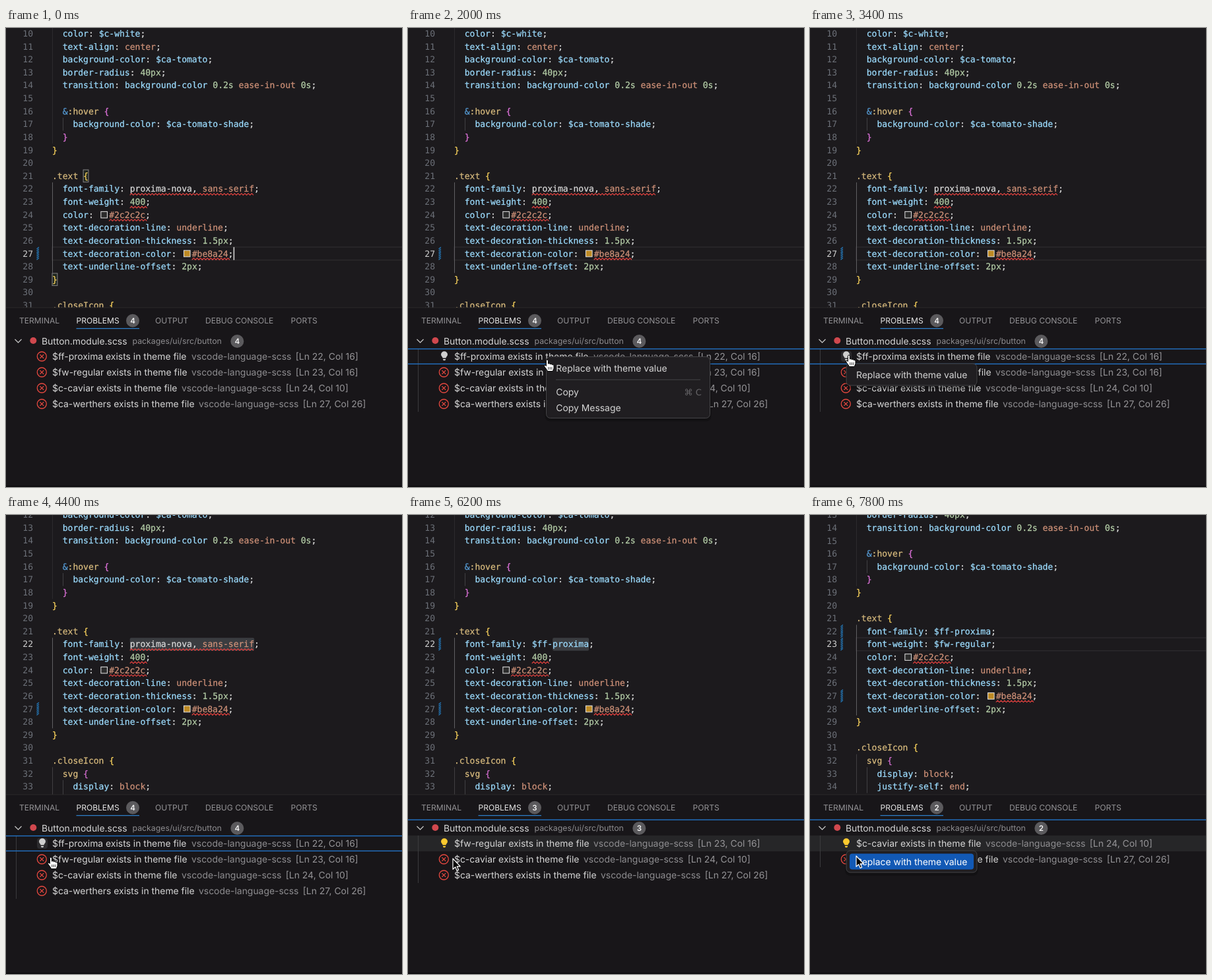
An HTML page for the animation above (8 s loop, 600 by 696 pixels).

```html
<!DOCTYPE html>
<html lang="en">
<head>
<meta charset="utf-8">
<title>Problems panel quick fix</title>
<style>
html, body { margin: 0; width: 100%; height: 100%; overflow: hidden; background: #1c1a1d; }
svg { display: block; width: 600px; height: 696px; font: 13.92px Inter, sans-serif; text-rendering: geometricPrecision; }
text { white-space: pre; }
.code { font: 13.04px "DejaVu Sans Mono", monospace; stroke-width: .25px; }
.tab { font-size: 12.05px; }
.path { font-size: 12.3px; }
.badge { font-size: 11.5px; font-weight: 600; text-anchor: middle; }
.keys { font: 13px "DejaVu Sans", sans-serif; }
</style>
</head>
<body>
<svg id="stage" viewBox="0 0 600 696"></svg>
<script>
const LOOP = 8000, STEP = 200;
const CHAR = 7.85, LINE = 19.62, LEFT = 70, SWATCH = 15.5, ROW = 24, LIST = 486;
const FIRST = 10;
const source = `  color: $c-white;
  text-align: center;
  background-color: $ca-tomato;
  border-radius: 40px;
  transition: background-color 0.2s ease-in-out 0s;

  &:hover {
    background-color: $ca-tomato-shade;
  }
}

.text {
  font-family: proxima-nova, sans-serif;
  font-weight: 400;
  color: #2c2c2c;
  text-decoration-line: underline;
  text-decoration-thickness: 1.5px;
  text-decoration-color: #be8a24;
  text-underline-offset: 2px;
}

.closeIcon {
  svg {
    display: block;
    justify-self: end;`.split('\n');

// message, location, x of the grey part
const problems = [
  ['$ff-proxima', '[Ln 22, Col 16]', 281],
  ['$fw-regular', '[Ln 23, Col 16]', 281],
  ['$c-caviar', '[Ln 24, Col 10]', 266],
  ['$ca-werthers', '[Ln 27, Col 26]', 292]
];

// pointer tip: time, x, y
const pointer = [
  [200, 430, 560], [600, 240, 530], [1000, 206, 514], [1400, 211, 503], [2600, 211, 503],
  [3000, 59, 496], [3400, 59, 496], [3600, 68, 519], [4600, 68, 519], [4800, 60, 503],
  [5000, 58, 497], [5400, 58, 497], [5800, 68, 521], [6800, 68, 521], [7200, 58, 497],
  [7600, 58, 497], [7800, 70, 517]
];

const rect = (x, y, w, h, fill, extra = '') =>
  `<rect x="${x}" y="${y}" width="${w}" height="${h}" fill="${fill}" ${extra}/>`;
const path = (d, stroke, width = 1, fill = 'none') =>
  `<path d="${d}" fill="${fill}" stroke="${stroke}" stroke-width="${width}" stroke-linejoin="round"/>`;
const text = (x, y, str, fill, cls = '') =>
  `<text x="${x}" y="${y}" fill="${fill}" class="${cls}">${str}</text>`;
const circle = (x, y, r, fill, extra = '') =>
  `<circle cx="${x}" cy="${y}" r="${r}" fill="${fill}" ${extra}/>`;
const badge = (x, y, n) => circle(x, y, 10, '#5b5a5d') + text(x, y + 4.2, n, '#f4f4f4', 'badge');
const colX = col => LEFT + col * CHAR;

function tokenColor(token, nested) {
  if (/^[{}]$/.test(token)) return nested ? '#da70d6' : '#ffd75e';
  if (token === '&') return '#569cd6';
  if (/^(:hover|\.|svg)/.test(token)) return '#d7ba7d';
  if (/^([:;,]|proxima)/.test(token)) return '#d8d8d8';
  if (/^\d/.test(token)) return '#b5cea8';
  if (/^(\$|color|text-|background|border|transition|font|display|justify)/.test(token)) return '#9cdcfe';
  return '#ce9178';
}

function codeLine(line, y) {
  const nested = line.startsWith('  ');
  const tokens = line.match(/\s+|&|:hover|[:;,{}]|[^\s:;,{}&]+/g) || [];
  const spans = tokens.map(tok => {
    const gap = tok[0] === '#' ? ` dx="${SWATCH}"` : '';
    const color = tokenColor(tok, nested);
    return `<tspan fill="${color}" stroke="${color}"${gap}>${tok.replace('&', '&amp;')}</tspan>`;
  });
  return text(LEFT, y, spans.join(''), '#d8d8d8', 'code');
}

function squiggle(x, y, width) {
  return path(`M${x} ${y}` + 'l2.6-2.6 2.6 2.6'.repeat(Math.round(width / 5.2)), '#e5423f', 1.2);
}

function hatch(y) {
  let d = '';
  for (let i = 0; i < 7; i++) d += `M46.5 ${y + 3 + i * 2.7}l3.4-3`;
  return path(d, '#2478b8', 1.3);
}

function editor(t) {
  const scroll = t < 4000 ? 0 : t < 6400 ? 48 : 67.6;
  const active = t < 4000 ? 27 : t < 6400 ? 22 : 23;
  const fixed = { 22: t >= 4600, 23: t >= 6800 };
  const base = n => 13 + (n - FIRST) * LINE - scroll;
  const top = n => base(n) - 14.3;
  const guide = (x, from, to, color) => path(`M${x} ${top(from)}V${top(to + 1)}`, color);
  let out = '';

  const select = (col, len) => rect(colX(col), top(active), len * CHAR, LINE, '#3a3c40', 'rx="2"');
  if (active === 22) out += t < 4600 ? select(15, 24) : select(19, 7);
  else if (active === 23 && t < 7000) out += select(15, t < 6800 ? 3 : 11);
  else out += rect(LEFT, top(active), 540, LINE, 'none', 'stroke="#2b292c" stroke-width="1.5"');

  out += guide(70.5, 10, 18, '#2c2b2e') + guide(86.5, 17, 17, '#403f42') +
    guide(70.5, 22, 28, '#605f62') + guide(70.5, 32, 34, '#403f42') + guide(86.5, 33, 34, '#403f42');

  if (t < 1600) {
    for (const [col, n] of [[6, 21], [0, 29]])
      out += rect(colX(col), top(n) + .5, CHAR, LINE - 1, '#20261f', 'stroke="#858487"');
  }

  source.forEach((line, i) => {
    const n = FIRST + i, y = base(n);
    if (fixed[n]) line = line.replace(/: .*;/, () => `: ${problems[n - 22][0]};`);
    out += text(25.3, y, n, n === active ? '#d0d0d0' : '#6c7078', 'code') + codeLine(line, y);
    if (n === 27 || fixed[n]) out += hatch(top(n));

    const hex = line.indexOf('#');
    if (hex > 0) {
      out += rect(colX(hex) + 3.2, y - 9.3, 9.6, 9.6, line.slice(hex, hex + 7), 'stroke="#e6e6e6"') +
        squiggle(colX(hex) + SWATCH, y + 5, 7 * CHAR);
    }
    if ((n === 22 || n === 23) && !fixed[n])
      out += squiggle(colX(15), y + 5, (n === 22 ? 24 : 3) * CHAR);
  });

  if (t < 1600 && t % 1000 < 500) out += rect(344.5, top(27), 1.7, LINE, '#c8c8c8');
  return out;
}

function bulb(y, color) {
  return path(`M52.6 ${y + 2.5}C52.4 ${y + .6} 50 ${y - .3} 50 ${y - 2.7}a5 5 0 0 1 10 0C60 ${y - .3} 57.6 ${y + .6} 57.4 ${y + 2.5}Z` +
    `M53 ${y + 4}h4v1.2q-2 2-4 0Z`, 'none', 0, color);
}

function errorIcon(y) {
  return circle(54.3, y, 7, 'none', 'stroke="#e5483f" stroke-width="1.3"') +
    path(`M51.4 ${y - 2.9}l5.8 5.8m0-5.8l-5.8 5.8`, '#e5483f', 1.3);
}

function panel(t, at) {
  const count = t < 4800 ? 4 : t < 7000 ? 3 : 2;
  const ring = t >= 1600 && t < 4800;
  let hover = -1;
  if (t >= 4800) hover = 0;
  else if (t >= 200 && t < 1600) hover = Math.floor((at[1] - LIST) / ROW);

  let out = rect(0, 424, 600, 272, '#181619') + rect(0, 423.5, 600, 1, '#2a282b') + rect(0, 694, 600, 2, '#0e0d0f');
  [['TERMINAL', 20], ['PROBLEMS', 106.5], ['OUTPUT', 226], ['DEBUG CONSOLE', 302], ['PORTS', 431.5]]
    .forEach(([name, x], i) => out += text(x, 448.2, name, i === 1 ? '#e7e7e7' : '#959497', 'tab'));
  out += rect(106.5, 455, 95.5, 1.3, '#2d7cc4') + badge(192, 443.7, count);

  if (t >= 4800) out += rect(0, 461.5, 600, 1.4, '#2272c3');
  out += path('M13.5 472l5 5 5-5', '#c5c5c5', 1.2) + circle(41.3, 474, 5, '#d0484e') +
    text(54, 479.6, 'Button.module.scss', '#d6d6d6') +
    text(191.5, 479.3, 'packages/ui/src/button', '#8d8c8f', 'path') + badge(350.3, 475, count);

  if (hover >= 0) out += rect(0, LIST + hover * ROW, 600, ROW, '#262628');
  if (t >= 200) out += rect(15, LIST, 1, count * ROW, '#3b3a3d');
  // the focus outline runs off both sides
  if (ring) out += rect(-2, LIST + .6, 604, ROW - 1.2, 'none', 'stroke="#2272c3" stroke-width="1.4"');
  if (ring && t >= 3000) out += rect(47, 490, 16, 16, '#2c2b2e', 'rx="4"');

  problems.slice(4 - count).forEach(([name, place, x], i) => {
    const y = LIST + 12 + i * ROW;
    if (i === hover) out += bulb(y, '#fbc92e');
    else if (ring && i === 0) out += bulb(y, '#cfcfcf');
    else out += errorIcon(y);
    out += text(70, y + 5, name + ' exists in theme file', '#d6d6d6') +
      text(x, y + 5, 'vscode-language-scss', '#8e8d90') + text(x + 157.8, y + 5, place, '#959497');
  });
  return out;
}

function popup(x, y, w, h) {
  return rect(x - 2, y + 1, w + 4, h + 4, '#000', 'rx="8" opacity=".25"') +
    rect(x, y, w, h, '#201e21', 'rx="6" stroke="#454447"');
}

function contextMenu() {
  return popup(209.5, 498.5, 248, 93) + rect(224, 532.8, 219, 1, '#434245') +
    text(224.3, 521, 'Replace with theme value', '#d6d6d6') + text(224.3, 557, 'Copy', '#d6d6d6') +
    text(418.5, 556.5, '⌘ C', '#656467', 'keys') + text(224.3, 581, 'Copy Message', '#d6d6d6');
}

function fixMenu(picked) {
  return popup(55, 509, 198, 33) + (picked ? rect(60, 513.5, 188, 24, '#1259b5', 'rx="4"') : '') +
    text(70, 530.5, 'Replace with theme value', picked ? '#fff' : '#d6d6d6');
}

function cursor([x, y], arrow) {
  const shape = arrow
    ? path('M0 0V16.2L3.7 12.8 6.2 18.4 8.6 17.3 6.2 11.8H11.2Z', '#fff', 1.2, '#000')
    : path('M-1.6 1.4C-1.6-.4 1.4-.4 1.4 1.4V6.2C2 5.2 4.2 5.4 4.4 6.9C5.2 6 7.2 6.3 7.4 7.8C8.4 7.2 10 7.6 10 9.4V12.5C10 14.5 8.6 15.5 8.4 17.5H.4C0 15.5-2.6 13-4 10.6C-5.2 8.8-3.4 7.6-2.2 8.8L-1.6 9.6Z', '#000', 1, '#fff') +
      path('M1.8 11v4M4.3 11v4M6.8 11v4', '#000', .8);
  return `<g transform="translate(${x} ${y})">${shape}</g>`;
}

function pointerAt(t) {
  const i = pointer.findIndex(k => k[0] > t);
  if (i < 0) return pointer[pointer.length - 1].slice(1);
  if (i === 0) return pointer[0].slice(1);
  const [t0, x0, y0] = pointer[i - 1], [t1, x1, y1] = pointer[i];
  const p = (t - t0) / (t1 - t0);
  return [x0 + (x1 - x0) * p, y0 + (y1 - y0) * p];
}

function scene(t) {
  const at = pointerAt(t);
  const within = (a, b) => t >= a && t < b;
  const picked = within(3600, 4000) || within(5800, 6200) || t >= 7800;
  let out = editor(t) + panel(t, at);
  if (within(1600, 2800)) out += contextMenu();
  if (within(3200, 4000) || within(5400, 6200) || t >= 7600) out += fixMenu(picked);
  if (t >= 200) out += cursor(at, picked || within(6200, 6600));
  return out;
}

const stage = document.getElementById('stage');
const start = performance.now();
let shown = -1;

function tick() {
  const t = Math.floor((performance.now() - start) % LOOP / STEP) * STEP;
  if (t !== shown) stage.innerHTML = scene(shown = t);
  requestAnimationFrame(tick);
}
tick();
</script>
</body>
</html>
```
